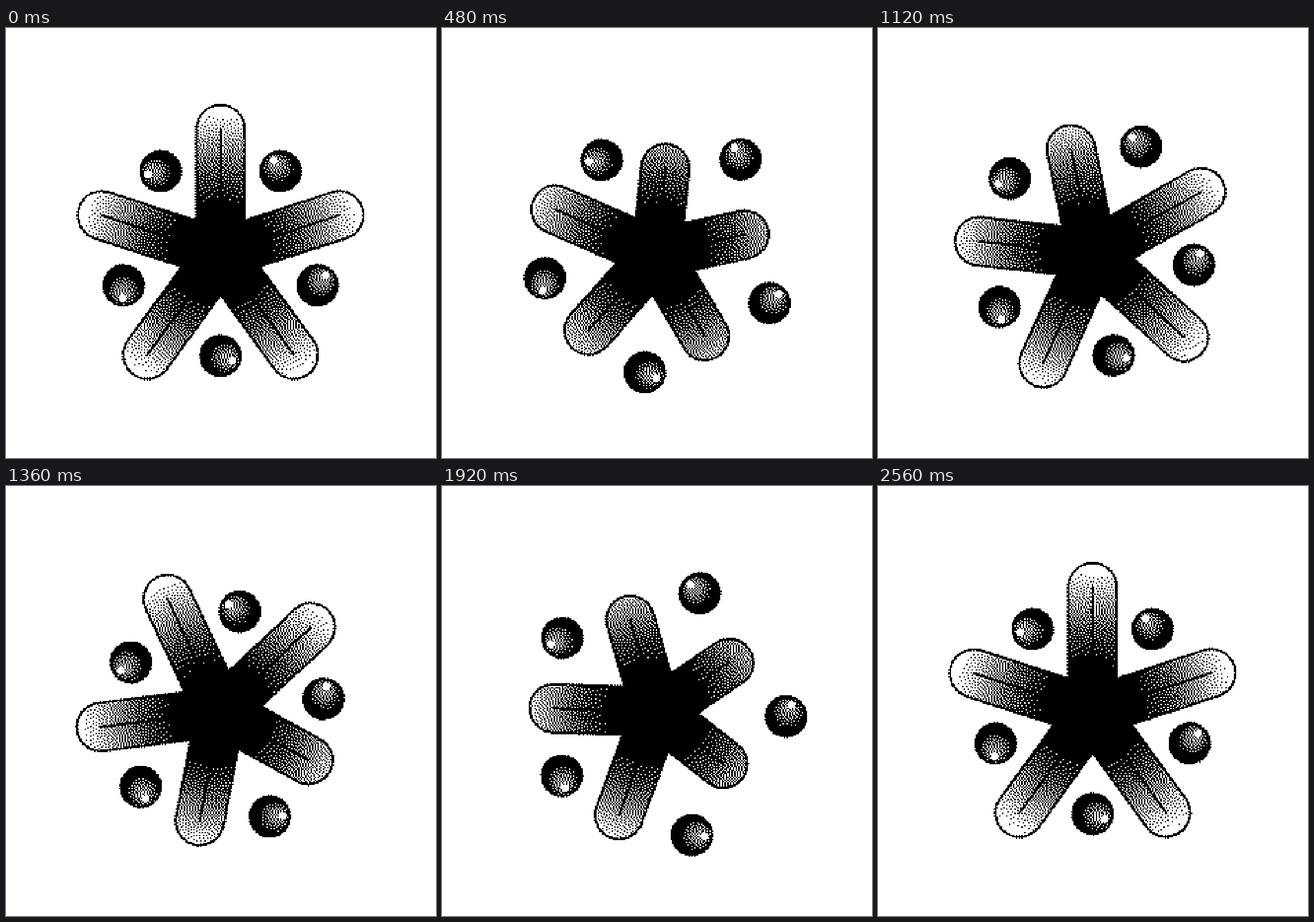
Recreate the animation shown at these times as an HTML page with a canvas. Size 748 by 748 pixels, loop 2.6 s.

```html
<!DOCTYPE html>
<html>
<head>
<meta charset="utf-8">
<style>
  html, body { margin: 0; width: 100%; height: 100%; overflow: hidden; background: #fff; }
  canvas { display: block; width: 100vw; height: 100vh; image-rendering: pixelated; }
</style>
</head>
<body>
<canvas id="stage" width="312" height="312"></canvas>
<script>
const STAGE = 748, CELLS = 312, LOOP = 2600, STEP = 40, STAGGER = 80;
const CX = 373.5, CY = 393, SECTOR = Math.PI * 2 / 5;
const ctx = document.getElementById('stage').getContext('2d', { willReadFrequently: true });

const clamp = x => Math.min(1, Math.max(0, x));
const easeOut = power => x => 1 - (1 - x) ** power;

// Cubic bezier easing with handles (x1, 0) and (x2, 1)
const easeInOut = (x1, x2) => x => {
  let lo = 0, hi = 1;
  for (let i = 0; i < 24; i++) {
    const s = (lo + hi) / 2, r = 1 - s;
    if (3 * x1 * s * r * r + 3 * x2 * s * s * r + s ** 3 < x) lo = s; else hi = s;
  }
  return lo * lo * (3 - 2 * lo);
};

const spin = easeInOut(0.69, 0.31);

// Start, end and easing: out, back, out, back
const armMoves = [
  [40, 560, easeOut(1.67)],
  [620, 1100, easeOut(1.72)],
  [1110, 1610, easeInOut(0.33, 0.5)],
  [1650, 2170, easeOut(1.36)]
];
const ballMoves = [
  [75, 640, easeOut(1.7)],
  [660, 1120, easeOut(1.57)],
  [1195, 1680, easeOut(1.65)],
  [1720, 2240, easeOut(1.67)]
];
const pulse = (moves, t) => moves.reduce((sum, [start, end, ease], i) =>
  sum + (i % 2 ? -1 : 1) * ease(clamp((t - start) / (end - start))), 0);

function gradient(circles, stops) {
  const fill = ctx.createRadialGradient(...circles);
  for (const [at, level] of stops) {
    const v = Math.round(level * 255);
    fill.addColorStop(at, `rgb(${v},${v},${v})`);
  }
  return fill;
}

function disc(x, y, r, fill) {
  ctx.fillStyle = fill;
  ctx.beginPath();
  ctx.arc(x, y, r, 0, Math.PI * 2);
  ctx.fill();
}

function arms(lengths, rotation, width, color) {
  ctx.strokeStyle = color;
  ctx.lineWidth = width;
  ctx.lineCap = 'round';
  ctx.beginPath();
  lengths.forEach((length, i) => {
    const a = rotation + i * SECTOR;
    ctx.moveTo(0, 0);
    ctx.lineTo(Math.sin(a) * length, -Math.cos(a) * length);
  });
  ctx.stroke();
}

function ball(angle, distance) {
  ctx.save();
  ctx.translate(Math.sin(angle) * distance, -Math.cos(angle) * distance);
  ctx.rotate(angle - 68 * Math.PI / 180);
  disc(0, 0, 37, '#000');
  disc(0, 0, 34, gradient([0, -16, 0, 0, -8, 29], [[0, 0.62], [0.45, 0.42], [1, 0]]));
  disc(0, -22.5, 6.5, '#fff');
  ctx.restore();
}

// Floyd-Steinberg stipple to pure black and white
function stipple() {
  const image = ctx.getImageData(0, 0, CELLS, CELLS), px = image.data;
  const level = new Float32Array(CELLS * (CELLS + 1) + 2);
  for (let i = 0; i < CELLS * CELLS; i++) level[i] = px[i * 4];
  for (let i = 0; i < CELLS * CELLS; i++) {
    const v = level[i] < 128 ? 0 : 255, error = (level[i] - v) / 16;
    px[i * 4] = px[i * 4 + 1] = px[i * 4 + 2] = v;
    level[i + 1] += error * 7;
    level[i + CELLS - 1] += error * 3;
    level[i + CELLS] += error * 5;
    level[i + CELLS + 1] += error;
  }
  ctx.putImageData(image, 0, 0);
}

function draw(time) {
  const t = (time - STEP + LOOP) % LOOP + STEP;
  const rotation = SECTOR * 3 * spin(clamp((t - STEP) / (LOOP - STEP)));
  const index = [0, 1, 2, 3, 4];
  const lengths = index.map(i => 217 - 70 * pulse(armMoves, t - i * STAGGER));
  const scale = CELLS / STAGE;

  ctx.setTransform(1, 0, 0, 1, 0, 0);
  ctx.fillStyle = '#fff';
  ctx.fillRect(0, 0, CELLS, CELLS);
  ctx.setTransform(scale, 0, 0, scale, CX * scale, CY * scale);

  arms(lengths, rotation, 88, '#000');
  arms(lengths, rotation, 80, gradient([0, 0, 0, 0, 0, 250],
    [[0, 0], [0.34, 0], [0.56, 0.26], [0.72, 0.53], [0.86, 0.78], [1, 1]]));
  arms(lengths, rotation, 4, '#000');
  for (const i of index) {
    ball(rotation + (i + 0.5) * SECTOR, 177.5 + 48 * pulse(ballMoves, t - i * STAGGER));
  }
  stipple();
}

let shown = -1;
function tick() {
  const time = Math.floor(performance.now() % LOOP / STEP) * STEP;
  if (time !== shown) draw(shown = time);
  requestAnimationFrame(tick);
}
tick();
</script>
</body>
</html>
```
